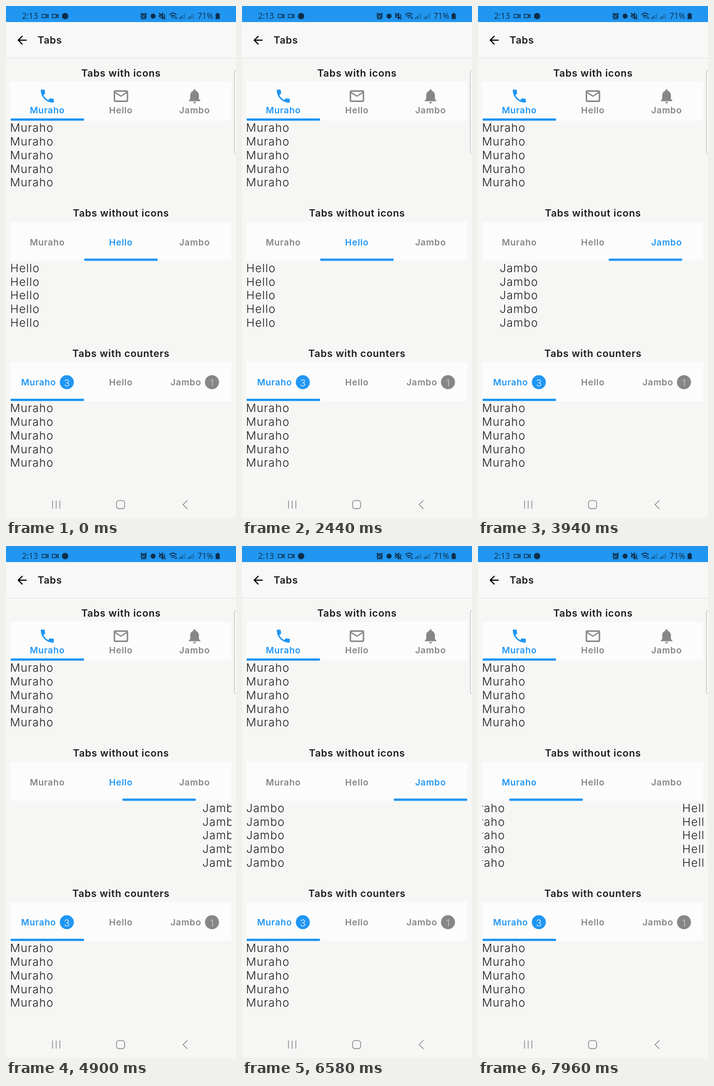
Recreate the animation shown at these times as an HTML page. Size 502 px wide and 1116 px high, loop 8000 ms.

```html
<!DOCTYPE html>
<html lang="en">
<head>
<meta charset="utf-8">
<title>Tabs</title>
<style>
  html, body { margin: 0; width: 100%; height: 100%; overflow: hidden; background: #f6f6f5; }
  svg { display: block; }
  text { font-family: Inter, sans-serif; fill: #1b1b1d; }
  .title { font-size: 21.6px; font-weight: 600; letter-spacing: .035em; }
  .label { font-size: 19.3px; font-weight: 600; letter-spacing: .04em; fill: #868686; }
  .label.on, .icon.on { fill: #2196f3; }
  .icon { fill: #868686; }
  .line { font-size: 24.6px; font-weight: 300; letter-spacing: .05em; }
  .count { font-size: 20px; font-weight: 300; fill: #d0d0d0; }
  .icon.on + .count { fill: #f4f8fc; }
  .mid { text-anchor: middle; }
  .bar text { font: 17.5px "Open Sans", sans-serif; fill: #0c2f4c; }
</style>
</head>
<body>
<svg id="stage" width="502" height="1116" viewBox="0 0 502 1116"></svg>
<script>
const LOOP = 8000, PAGE = 482, TAB = 160.7, GAP = 305.5;
const WORDS = ['Muraho', 'Hello', 'Jambo'];
const ICONS = [
  'M6.62 10.79c1.44 2.83 3.76 5.14 6.59 6.59l2.2-2.2c.27-.27.67-.36 1.02-.24 1.12.37 2.33.57 3.57.57.55 0 1 .45 1 1V20c0 .55-.45 1-1 1-9.39 0-17-7.61-17-17 0-.55.45-1 1-1h3.5c.55 0 1 .45 1 1 0 1.25.2 2.45.57 3.57.11.35.03.74-.25 1.02z',
  'M22 6c0-1.1-.9-2-2-2H4c-1.1 0-2 .9-2 2v12c0 1.1.9 2 2 2h16c1.1 0 2-.9 2-2zm-2 0l-8 5-8-5zm0 12H4V8l8 5 8-5z',
  'M12 22c1.1 0 2-.9 2-2h-4c0 1.1.89 2 2 2zm6-6v-5c0-3.07-1.64-5.64-4.5-6.32V4c0-.83-.67-1.5-1.5-1.5s-1.5.67-1.5 1.5v.68C7.63 5.36 6 7.92 6 11v5l-2 2v1h16v-1z'
];
const BACK = 'M20 11H7.83l5.59-5.59L12 4l-8 8 8 8 1.41-1.41L7.83 13H20z';
// Tab taps: [time, tab index]
const TAPS = [[3702, 2], [4700, 1], [5696, 2], [6873, 1], [7735, 0]];

const text = (x, y, cls, s) => `<text x="${x}" y="${y}" class="${cls}">${s}</text>`;
const glyph = (x, y, scale, cls, d) =>
  `<path class="${cls}" transform="translate(${x} ${y}) scale(${scale}) translate(-12 -12)" d="${d}"/>`;
const tabX = i => 9.8 + TAB * i;

function page(i) {
  const lines = [0, 1, 2, 3, 4].map(n => text(-.8, 24.3 + n * 29.75, 'line', WORDS[i]));
  return `<g class="page">${lines.join('')}</g>`;
}

function tab(i, kind, active) {
  const on = i === active ? ' on' : '', cx = tabX(i) + TAB / 2;
  const count = kind === 'counters' && ['3', '', '1'][i];
  let out = text(count ? cx - 19 : cx, kind === 'icons' ? 234 : 216.3, 'label mid' + on, WORDS[i]);
  if (kind === 'icons') out += glyph(cx, 196.5, 1.58, 'icon' + on, ICONS[i]);
  if (count) {
    const bx = cx + (i ? 38 : 42.6);
    out += `<circle class="icon${on}" cx="${bx}" cy="209" r="15.3"/>` + text(bx, 217.8, 'count mid', count);
  }
  return out;
}

function section(n, title, kind, active) {
  return `<g id="s${n}" transform="translate(0 ${n * GAP})">
    ${text(251, 153.8, 'title mid', title)}
    <rect x="9" y="165" width="483" height="85" fill="#fcfcfc"/>
    ${WORDS.map((_, i) => tab(i, kind, active)).join('')}
    <rect class="mark" x="${tabX(active)}" y="245" width="${TAB}" height="5" rx="2" fill="#2196f3"/>
    <svg x="9.5" y="250" width="482.5" height="152">
      ${kind === 'plain' ? WORDS.map((_, i) => page(i)).join('') : page(active)}
    </svg></g>`;
}

const camera = x => `<path d="M${x} 18h8.500v7.500h-8.500zM${x + 9} 21l4-2.500v7l-4-2.500" fill="none" stroke-width="1.6"/>`;
const signal = x => [0, 1, 2, 3].map(i =>
  `<path d="M${x + i * 3.7} 28v${-3 - i * 3}" stroke-width="1.8" opacity="${i < 2 ? 1 : .4}"/>`).join('');

const statusBar = `<g class="bar" stroke="#0c2f4c" fill="#0c2f4c">
  <rect width="502" height="35" fill="#2196f0" stroke="none"/>
  <g stroke="none">${text(35, 27.5, '', '2:13')}${text(418, 27.5, '', '71%')}
    <circle cx="129" cy="22" r="7"/><circle cx="321" cy="22" r="5.5"/></g>
  ${camera(79)}${camera(101)}
  <g fill="none" stroke-width="2">
    <circle cx="300.5" cy="22.5" r="4.8" stroke-width="3"/>
    <path d="M300.5 19v4h3M294 18l3-3M307 18l-3-3M296 28l-1 1M305 28l1 1"/>
    <path d="M335 20h3l4-4v12l-4-4h-3zM345 18q3 4 0 8M334 15l14 14"/>
    <path d="M356.5 19q8-7 16 0M359 22.5q5.5-4 11 0M362 25.5q2.5-2 5 0" stroke-width="1.8"/>
    <path d="M371 23v5M369 26l2 2 2-2" stroke-width="1.2"/>
  </g>
  ${signal(379)}${signal(398)}
  <path d="M457.5 17h2.5v-2h4v2h2.5v11.5h-9z" stroke="none"/></g>`;

const stage = document.getElementById('stage');
stage.innerHTML = `
  <rect width="502" height="1116" fill="#f6f6f5"/>
  <rect y="35" width="502" height="78" fill="#f8f8f8"/>
  ${statusBar}
  <path d="M0 113.5H502" stroke="#dedee1"/>
  ${glyph(35, 74.5, 1.25, '', BACK)}
  ${text(69, 82, 'title', 'Tabs')}
  ${section(0, 'Tabs with icons', 'icons', 0)}
  ${section(1, 'Tabs without icons', 'plain', 1)}
  ${section(2, 'Tabs with counters', 'counters', 0)}
  <rect x="498.5" y="140.5" width="12" height="182" rx="4" fill="#f9f9f9" stroke="#aaa"/>
  <g fill="none" stroke="#858585" stroke-width="1.6">
    <path d="M101.5 1078v17.5M109.5 1078v17.5M117.5 1078v17.5M396 1077.5l-9.5 9.3 9.5 9.3"/>
    <rect x="241.3" y="1078" width="17.6" height="17.6" rx="5"/>
  </g>`;

const pages = stage.querySelectorAll('#s1 .page');
const labels = stage.querySelectorAll('#s1 .label');
const mark = stage.querySelector('#s1 .mark');
const clamp = v => Math.min(1, Math.max(0, v));
const quint = v => 1 - (1 - v) ** 5;
const smooth = v => (1 - Math.cos(Math.PI * v)) / 2;

function draw(t) {
  let active = 1, scroll = 1, slide = 1;
  for (const [start, to] of TAPS) {
    if (t < start) break;
    active = to;
    scroll += (to - scroll) * quint(clamp((t - start) / 600));
    slide += (to - slide) * smooth(clamp((t - start - 79) / 250));
  }
  pages.forEach((p, i) => p.setAttribute('transform', `translate(${.5 + (i - scroll) * PAGE} 0)`));
  labels.forEach((l, i) => l.classList.toggle('on', i === active));
  mark.setAttribute('x', tabX(slide));
}

const origin = performance.now();
function frame() {
  draw((performance.now() - origin) % LOOP);
  requestAnimationFrame(frame);
}
frame();
</script>
</body>
</html>
```
